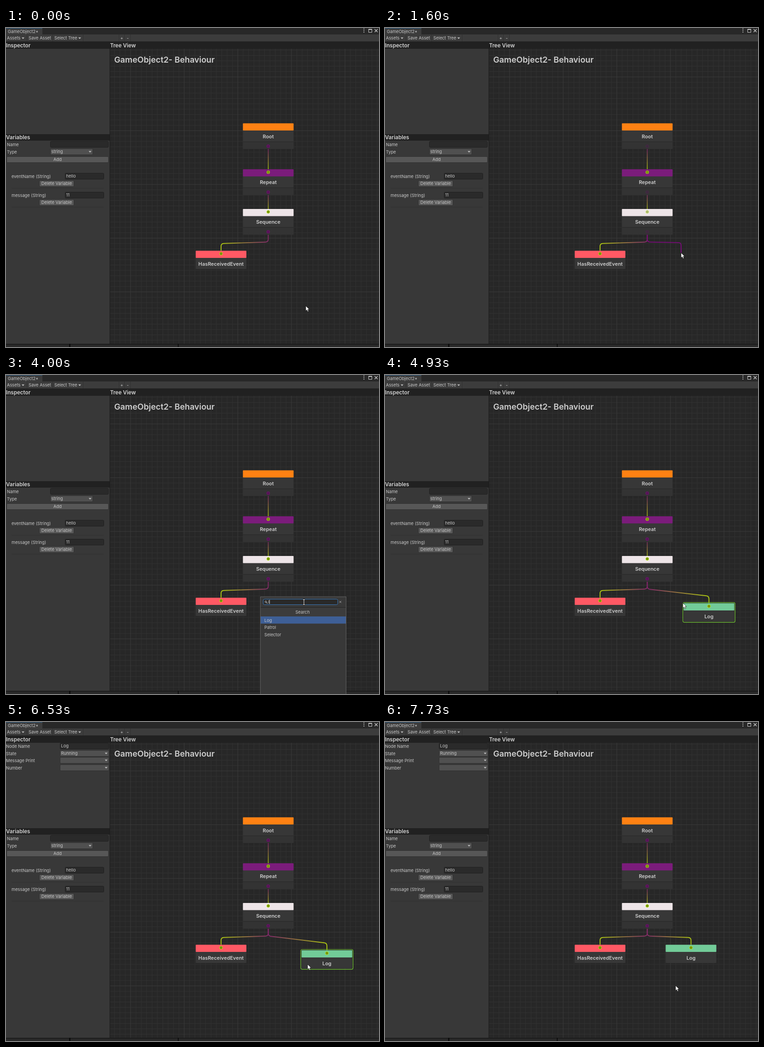
Animation, 810 px wide and 691 px high, one loop 8 s. Source, as an HTML page:

```html
<!DOCTYPE html>
<html lang="en">
<head>
<meta charset="utf-8">
<title>Behaviour tree editor</title>
<style>
html, body { margin: 0; width: 100%; height: 100%; overflow: hidden; background: #383838; }
svg { display: block; width: 100%; height: 100%; }
text { font: 400 9.31px Inter, "Liberation Sans", sans-serif; fill: #c8c8c8; white-space: pre; }
.head { font-size: 11.64px; font-weight: 600; fill: #d4d4d4; }
.node { font-size: 10.86px; font-weight: 600; fill: #cdcdcd; }
.title { font-size: 17.85px; font-weight: 600; fill: #cfcfcf; }
.mid { text-anchor: middle; }
</style>
</head>
<body>
<svg id="stage" viewBox="0 0 810 691"></svg>
<script>
const LOOP = 8000, STEP = 1000 / 15;
const PURPLE = '#7a0a7a', LIME = '#b4e600', HOVER = '#70c531';

// --- markup helpers ---
const rect = (x, y, w, h, fill, extra = '') =>
  `<rect x="${x}" y="${y}" width="${w}" height="${h}" fill="${fill}" ${extra}/>`;
const box = (x, y, w, h, fill, line, r = 2) =>
  rect(x + .5, y + .5, w - 1, h - 1, fill, `rx="${r}" stroke="${line}"`);
const text = (x, y, s, cls = '') => `<text x="${x}" y="${y}" class="${cls}">${s}</text>`;
const path = (d, stroke, w = 1, extra = '') =>
  `<path d="${d}" fill="none" stroke="${stroke}" stroke-width="${w}" ${extra}/>`;
const group = (id, body) => `<g id="${id}">${body}</g>`;
const arrow = (x, y) => `<path d="M${x - 3} ${y - 1.5}h6l-3 3.2z" fill="#c4c4c4"/>`;
const field = (x, y, w, s = '') => box(x, y, w, 14, '#2a2a2a', '#202020') + text(x + 2.5, y + 10.3, s);
const button = (x, y, w, s) => box(x, y, w, 14, '#575757', '#303030') + text(x + w / 2, y + 10.3, s, 'mid');
const dropdown = (x, y, w, s = '') =>
  box(x, y, w, 14, '#505050', '#303030') + text(x + 2.5, y + 10.2, s) + arrow(x + w - 6.5, y + 7);

// --- static window parts ---
function grid() {
  const gap = 11.64, x0 = 270.6, y0 = 106;
  let thin = '', thick = '';
  const add = (i, seg) => { if (i % 10) thin += seg; else thick += seg; };
  for (let i = -3; x0 + i * gap < 810; i++) add(i, `M${(x0 + i * gap).toFixed(2)} 45V684`);
  for (let i = -5; y0 + i * gap < 684; i++) add(i, `M226 ${(y0 + i * gap).toFixed(2)}H810`);
  return rect(226, 45, 584, 639, '#272727') + path(thin, '#323232') + path(thick, '#3b3b3b');
}

function topBar() {
  let s = rect(0, 0, 810, 14, '#282828') + rect(0, 0, 79, 14, '#3c3c3c') + rect(0, 0, 79, 1, '#2c5d87');
  s += text(4, 10.7, 'GameObject2*');
  s += [2, 5.5, 9].map(y => `<circle cx="777.3" cy="${y}" r="1" fill="#c8c8c8"/>`).join('');
  s += path('M787.5 2.5h7v7h-7zM787 3.5h8', '#c8c8c8') + path('M800.5 2.5l6.5 6.5m0-6.5l-6.5 6.5', '#c8c8c8', 1.3);
  s += rect(0, 14, 810, 16, '#3c3c3c') + rect(0, 29, 810, 1, '#232323');
  s += path('M45.5 14V29M101.5 14V29M167.5 14V29M245.5 14V29M257.5 14V29M270.5 14V29', '#313131');
  s += text(2, 24.9, 'Assets') + arrow(37, 22) + text(49, 24.5, 'Save Asset');
  s += text(105, 24.9, 'Select Tree') + arrow(160, 22);
  return s + text(251.3, 24.7, '+', 'mid') + text(264.5, 24.7, '-', 'mid');
}

function variable(y, name, value) {
  return text(12, y + 10.5, name) + field(128, y, 85, value) +
    button(72, y + 16, 76, 'Delete Variable') + rect(12, y + 32.5, 200, 1, '#303030');
}

function sidePanel() {
  return rect(0, 30, 225, 654, '#383838') + rect(0, 30, 810, 15, '#212121') + rect(0, 230, 225, 14, '#212121') +
    rect(225, 30, 1, 654, '#1b1b1b') +
    text(0, 41.7, 'Inspector', 'head') + text(226, 41.7, 'Tree View', 'head') + text(0, 241.2, 'Variables', 'head') +
    text(2, 256, 'Name') + field(96, 245, 127) + text(2, 271.5, 'Type') + dropdown(96, 261, 93, 'string') +
    button(1, 278, 222, 'Add') + variable(314, 'eventName (String)', 'hello') + variable(355, 'message (String)', '11');
}

function inspector() {
  const labels = ['Node Name', 'State', 'Message Print', 'Number'];
  return labels.map((s, i) => text(0, 56 + i * 15.5, s)).join('') + field(117, 45, 107, 'Log') +
    dropdown(117, 61, 107, 'Running') + dropdown(117, 76, 107) + dropdown(117, 92, 107);
}

const bottomBar = () => rect(0, 684, 810, 7, '#1c1c1c') + rect(0, 686, 810, 5, '#292929') +
  rect(137, 684, 3, 7, '#0c0c0c') + rect(373, 684, 2, 7, '#0c0c0c');

// --- nodes and edges ---
const W = 110;
const NODES = {
  root: { x: 514.5, y: 206.5, name: 'Root', color: '#ff8113', out: true },
  repeat: { x: 514.5, y: 306, name: 'Repeat', color: '#7b1c7b', in: true, out: true },
  seq: { x: 514.5, y: 392, name: 'Sequence', color: '#eee5e8', in: true, out: true },
  event: { x: 412, y: 482.5, name: 'HasReceivedEvent', color: '#ff5964', in: true },
  log: { x: 648.5, y: 494.5, name: 'Log', color: '#72cb98', in: true }
};
const height = n => n.out ? 55.5 : 39.5;
const port = (y, color, cls) => `<g class="${cls}"><circle cx="55" cy="${y}" r="2.9" fill="#272727" stroke="${color}" stroke-width="1.3"/>` +
  `<circle cx="55" cy="${y}" r="1.3" fill="${color}"/></g>`;

function node(id) {
  const n = NODES[id], h = height(n);
  let s = rect(0, 0, W, h, '#373737', 'rx="1.5"') + rect(0, 0, W, 15.5, n.color, 'rx="1"');
  if (n.out) s += rect(0, 40, W, 15.5, '#333') + rect(0, 39.5, W, 1, '#272727') + port(49.5, PURPLE, 'out');
  if (n.in) s += port(6.3, LIME, 'in');
  s += text(55, n.out ? 32.2 : 32.4, n.name, 'node mid');
  s += rect(-1.7, -1.7, W + 3.4, h + 3.4, 'none', `class="hover" rx="3" stroke="${HOVER}" stroke-width="1.2"`);
  return `<g id="${id}" transform="translate(${n.x} ${n.y})">${s}</g>`;
}

const outPort = n => [n.x + 55, n.y + 49.5];
const inPort = n => [n.x + 55, n.y + 6.5];

// Vertical stubs joined by a slanted run with rounded corners.
function route([ax, ay], [bx, by]) {
  if (Math.abs(ax - bx) < 1) return `M${ax} ${ay}V${by}`;
  const p = ay + 22, q = by - 22, len = Math.hypot(bx - ax, q - p);
  const r = Math.min(6, len / 2), ux = (bx - ax) / len * r, uy = (q - p) / len * r;
  return `M${ax} ${ay}V${p - r}Q${ax} ${p} ${ax + ux} ${p + uy}L${bx - ux} ${q - uy}Q${bx} ${q} ${bx} ${q + r}V${by}`;
}
function edge(id, a, b) {
  const flat = Math.abs(a[0] - b[0]) < 1, pad = flat ? 0 : 22 * Math.sign(b[0] - a[0]);
  const y2 = flat ? b[1] : a[1];
  return `<linearGradient id="${id}" gradientUnits="userSpaceOnUse" x1="${a[0] - pad}" y1="${a[1]}" x2="${b[0] + pad}" y2="${y2}">` +
    `<stop stop-color="${PURPLE}"/><stop offset="1" stop-color="${LIME}"/></linearGradient>` +
    path(route(a, b), `url(#${id})`, flat ? 1.5 : 1.9);
}

// --- search menu ---
function menu(query) {
  const found = ['Log', 'Patrol', 'Selector'].filter(s => s.toLowerCase().includes(query));
  const items = query ? found : ['Decorator', 'Conditional', 'Composite', 'Action'];
  const caret = 570 + [0, 1.9, 7.4, 13.2][query.length];
  let s = rect(552.5, 480.5, 186, 215, '#383838', 'stroke="#616161"') + rect(553, 503, 185, 1, '#242424') +
    rect(553, 504, 185, 19, '#3c3c3c') + box(558, 485, 163, 13, '#292929', '#3a79bb', 3);
  s += '<circle cx="564.2" cy="491.2" r="1.8" fill="none" stroke="#c4c4c4"/>' + path('M565.6 492.6l2.2 2.2', '#c4c4c4', 1.2);
  s += text(569.5, 495.2, query) + rect(caret, 487, 1, 9, '#c8c8c8');
  if (query) s += path('M724 489.5l4 4m0-4l-4 4', '#b0b0b0');
  s += text(query ? 644 : 645.5, 516.7, query ? 'Search' : 'Create Node', 'mid') + rect(553, 523, 185, 15.5, '#3e5f96');
  items.forEach((name, i) => {
    const y = 531 + i * 15.5;
    s += text(query ? 561 : 567, y + 3.6, name);
    if (!query) s += path(`M730.3 ${y - 3}l3.3 3l-3.3 3`, '#b4b4b4');
  });
  return s;
}

const arrowCursor = '<path d="M0 0V10.8L2.5 8.5L4.2 12.4L6.2 11.5L4.5 7.8H7.8Z" fill="#fff" stroke="#111" stroke-width=".7"/>';
const beamCursor = path('M-2.5-5.5H2.5M0-5.5V5.5M-2.5 5.5H2.5', '#111', 2.4) + path('M-2.2-5.5H2.2M0-5.5V5.5M-2.2 5.5H2.2', '#eee', 1.1);

// --- motion tables: [time, x, y] ---
const POINTER = [[0, 651, 602], [800, 569, 441], [1050, 569, 441], [1600, 643, 487], [1900, 643, 487], [2070, 644, 491],
  [2270, 645, 492], [2530, 646, 492], [3390, 646, 492], [3400, 647, 492], [4790, 647, 492], [4800, 647, 494],
  [6000, 647, 494], [6330, 661, 525], [6400, 660, 525], [6533, 655, 525], [6870, 624, 512], [6933, 622.5, 511],
  [7333, 622.5, 511], [7733, 631, 571]];
const DRAG = [[6330, 648.5, 494.5], [6400, 647, 494.5], [6533, 642, 494.5], [6800, 617, 485], [6870, 611, 482.5], [6933, 609.5, 482.5]];

function at(table, t) {
  if (t <= table[0][0]) return table[0].slice(1);
  for (let i = 1; i < table.length; i++) {
    const [t0, x0, y0] = table[i - 1], [t1, x1, y1] = table[i];
    if (t > t1) continue;
    let k = (t - t0) / (t1 - t0);
    if (t1 - t0 > 300) k = k * k * (3 - 2 * k);
    return [x0 + (x1 - x0) * k, y0 + (y1 - y0) * k];
  }
  return table[table.length - 1].slice(1);
}

// --- scene ---
const stage = document.getElementById('stage');
const { root, repeat, seq, event, log } = NODES;
stage.innerHTML = rect(0, 0, 810, 691, '#383838') + grid() + text(235, 75.3, 'GameObject2- Behaviour', 'title') +
  edge('e1', outPort(root), inPort(repeat)) + edge('e2', outPort(repeat), inPort(seq)) +
  edge('e3', outPort(seq), inPort(event)) + group('link', '') +
  Object.keys(NODES).map(node).join('') +
  group('snap', path('M410 482.5H722M410 522H722', '#44c0ff', 1, 'opacity=".27"')) +
  sidePanel() + group('inspector', inspector()) + topBar() + bottomBar() +
  group('menu', '') + group('pointer', '');

const $ = id => document.getElementById(id);
const show = (el, on) => el.setAttribute('display', on ? 'inline' : 'none');
const last = {};
function fill(id, html) {
  if (last[id] !== html) $(id).innerHTML = last[id] = html;
}
const move = (id, x, y) => $(id).setAttribute('transform', `translate(${x} ${y})`);

function draw(now) {
  const t = now % LOOP, f = Math.floor((t + 4) / STEP) * STEP + 1;
  const since = (a, b = Infinity) => t >= a - 4 && t < b - 4;
  const [px, py] = at(POINTER, f);
  const wiring = since(1070, 2270), menuOpen = since(2330, 4800), hasLog = since(4870);
  [log.x, log.y] = at(DRAG, f);

  move('log', log.x, log.y);
  show($('log'), hasLog);
  show($('inspector'), since(6330));
  show($('snap'), since(6870, 7400));

  const start = outPort(seq);
  fill('link', wiring ? path(route(start, [px, Math.max(py, start[1])]), PURPLE, 1.9)
    : hasLog ? edge('e4', start, inPort(log)) : '');

  for (const id in NODES) {
    const n = NODES[id], g = $(id);
    const inside = px > n.x - 2.5 && px < n.x + W + 2 && py > n.y - 2.5 && py < n.y + height(n) + 2;
    show(g.querySelector('.hover'), inside && !menuOpen);
    if (n.out) g.querySelector('.out').setAttribute('opacity', wiring ? .3 : 1);
  }
  $('seq').querySelector('.in').setAttribute('opacity', wiring ? .55 : 1);

  const query = since(4270) ? 'log' : since(4200) ? 'lo' : since(4000) ? 'l' : '';
  fill('menu', menuOpen ? menu(query) : '');
  fill('pointer', since(2530, 4800) ? beamCursor : arrowCursor);
  move('pointer', px, py);
}

const begin = performance.now();
function tick() {
  draw(performance.now() - begin);
  requestAnimationFrame(tick);
}
tick();
</script>
</body>
</html>
```
